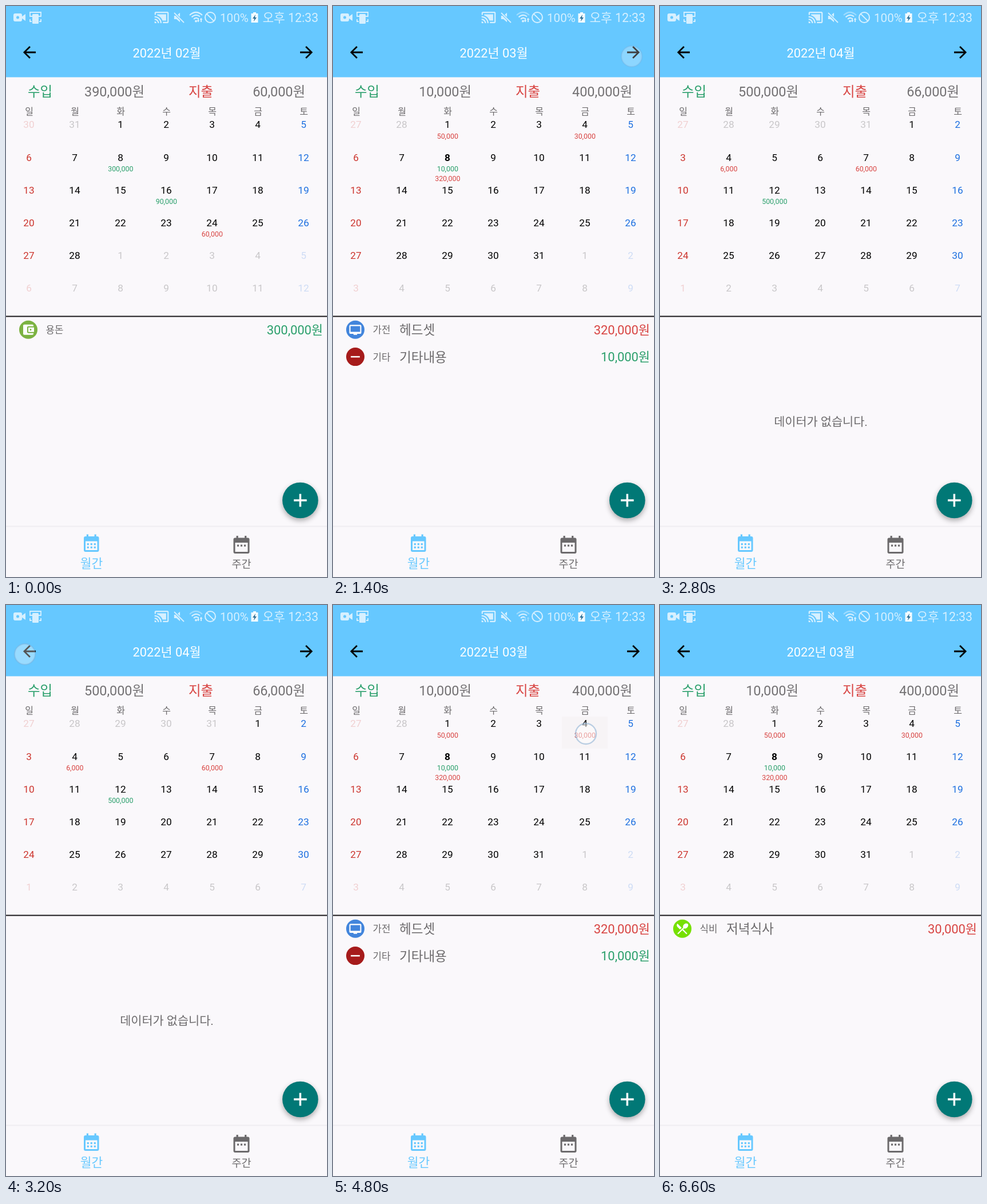
An HTML page with a canvas for the animation above (6700 ms loop, 561 px wide and 998 px high).

```html
<!DOCTYPE html>
<html lang="ko">
<head>
<meta charset="utf-8">
<style>
html, body { margin: 0; height: 100%; overflow: hidden; background: #faf8fb; }
canvas { display: block; width: 561px; height: 998px; }
</style>
</head>
<body>
<canvas id="stage" width="561" height="998"></canvas>
<script>
const ctx = document.getElementById('stage').getContext('2d');
const BG = '#faf8fb', BLUE = '#66c8ff', GREY = '#6c6a6c', GREEN = '#2a9f6b', RED = '#d84442', STATUS = '#d6f0ff';
const LOOP = 6700;

// Icons on a 24 unit grid
const ICON = {
  back: 'M20 11H7.83l5.59-5.59L12 4l-8 8 8 8 1.41-1.41L7.83 13H20v-2z',
  next: 'M12 4l-1.41 1.41L16.17 11H4v2h12.17l-5.58 5.59L12 20l8-8z',
  wallet: 'M21 18v1c0 1.1-.9 2-2 2H5c-1.11 0-2-.9-2-2V5c0-1.1.89-2 2-2h14c1.1 0 2 .9 2 2v1h-9c-1.11 0-2 .9-2 2v8c0 1.1.89 2 2 2h9zm-9-2h10V8H12v8zm4-2.5c-.83 0-1.5-.67-1.5-1.5s.67-1.5 1.5-1.5 1.5.67 1.5 1.5-.67 1.5-1.5 1.5z',
  tablet: 'M4 4h16a2 2 0 0 1 2 2v11a2 2 0 0 1-2 2h-5v1.5H9V19H4a2 2 0 0 1-2-2V6a2 2 0 0 1 2-2zm0 2v9.500h16V6z',
  minus: 'M4.500 10.800h15v2.400h-15z',
  food: 'M8.1 13.34l2.83-2.83L3.91 3.5c-1.56 1.56-1.56 4.09 0 5.66l4.19 4.18zm6.78-1.81c1.53.71 3.68.21 5.27-1.38 1.91-1.91 2.28-4.65.81-6.12-1.46-1.46-4.2-1.1-6.12.81-1.59 1.59-2.09 3.74-1.38 5.27L3.7 19.87l1.41 1.41L12 14.41l6.88 6.88 1.41-1.41L13.41 13l1.47-1.47z',
  cast: 'M1 18v3h3c0-1.66-1.34-3-3-3zm0-4v2c2.76 0 5 2.24 5 5h2c0-3.87-3.13-7-7-7zm18-7H5v1.63c3.96 1.28 7.09 4.41 8.37 8.37H19V7zM1 10v2c4.97 0 9 4.03 9 9h2c0-6.08-4.93-11-11-11zm20-7H3c-1.1 0-2 .9-2 2v3h2V5h18v14h-7v2h7c1.1 0 2-.9 2-2V5c0-1.1-.9-2-2-2z',
  mute: 'M4 9v6h4l6 5V4L8 9z'
};

const MONTHS = {
  2: { income: '390,000', spent: '60,000', marks: { 8: [[GREEN, '300,000']], 16: [[GREEN, '90,000']], 24: [[RED, '60,000']] } },
  3: { income: '10,000', spent: '400,000', marks: { 1: [[RED, '50,000']], 4: [[RED, '30,000']], 8: [[GREEN, '10,000'], [RED, '320,000']] } },
  4: { income: '500,000', spent: '66,000', marks: { 4: [[RED, '6,000']], 7: [[RED, '60,000']], 12: [[GREEN, '500,000']] } }
};
const POCKET = [['wallet', '#7cb342', '용돈', '', GREEN, '300,000']];
const MARCH_8 = [
  ['tablet', '#4285dc', '가전', '헤드셋', RED, '320,000'],
  ['minus', '#a61b1b', '기타', '기타내용', GREEN, '10,000']
];
const MARCH_4 = [['food', '#76e000', '식비', '저녁식사', RED, '30,000']];

// [start, month, list]
const SCENES = [[0, 2, POCKET], [800, 3, MARCH_8], [1900, 4, []], [3400, 3, MARCH_8], [5100, 3, MARCH_4]];
// [start, length, x, y]
const TOUCHES = [[500, 300, 522, 88], [1400, 400, 522, 88], [3000, 300, 33, 86], [4700, 300, 442, 225]];

function text(s, x, y, size, color, align = 'center', weight = 400) {
  ctx.font = `${weight} ${size}px Roboto, "Noto Sans CJK KR", sans-serif`;
  ctx.textAlign = align;
  ctx.fillStyle = color;
  ctx.fillText(s, x, y);
}

function box(x, y, w, h, color, r = 0) {
  ctx.fillStyle = color;
  ctx.beginPath();
  ctx.roundRect(x, y, w, h, r);
  ctx.fill();
}

function disc(x, y, r, color) {
  ctx.fillStyle = color;
  ctx.beginPath();
  ctx.arc(x, y, r, 0, 7);
  ctx.fill();
}

function shape(d, color) {
  ctx.fillStyle = color;
  ctx.fill(new Path2D(d));
}

function stroke(d, color, width) {
  ctx.strokeStyle = color;
  ctx.lineWidth = width;
  ctx.stroke(new Path2D(d));
}

function icon(name, x, y, scale, color) {
  ctx.save();
  ctx.translate(x, y);
  ctx.scale(scale, scale);
  ctx.translate(-12, -12);
  ctx.fillStyle = color;
  ctx.fill(new Path2D(ICON[name]), name === 'tablet' ? 'evenodd' : 'nonzero');
  ctx.restore();
}

function statusBar(t) {
  box(13, 13, 15, 14, STATUS, 3);
  shape('M27 19l7-5v12l-7-5z', STATUS);
  disc(20.5, 20, 2.5, BLUE);
  stroke('M46 18H42V11H61V18H57M42 23V27H45M61 23V27H58', STATUS, 1.8);
  box(46, 14, 11, 17, STATUS, 1.5);
  icon('cast', 272, 20, 1.12, STATUS);
  icon('mute', 302, 20, 1.02, STATUS);
  stroke('M294 12L311 29', BLUE, 4);
  stroke('M294 12L311 29', STATUS, 1.8);

  ctx.globalAlpha = t < 1400 ? 1 : 0.5;
  stroke('M321 16Q332 6 343 16', STATUS, 2.2);
  ctx.globalAlpha = 1;
  stroke('M324.500 19.500Q332 13 339 18.500M328 23Q332 19.500 335 22', STATUS, 2.2);
  disc(332, 26.5, 2, STATUS);
  ctx.globalAlpha = t >= 4400 && t < 6400 ? 0.4 : 1;
  shape('M335 21h2v4h1.500l-2.500 3.500-2.500-3.500h1.500zM340 28h2v-4h1.500l-2.500-3.500-2.500 3.500h1.500z', STATUS);
  ctx.globalAlpha = 1;

  stroke('M366 20A9 9 0 1 1 348 20A9 9 0 1 1 366 20M350.600 13.600L363.400 26.400', STATUS, 2);
  text('100%', 374, 28, 20.6, STATUS, 'left');
  shape('M432 11h5v2h3.500v16h-12v-16h3.500z', '#f2fbff');
  shape('M436 15l-5 7h3l-1 5 5-7h-3z', '#2f6f96');
  text('오후 12:33', 546, 28, 21.3, STATUS, 'right');
}

function calendar(month) {
  const { income, spent, marks } = MONTHS[month];
  text(`2022년 0${month}월`, 281, 89.5, 21.8, '#fff');
  text('수입', 59.5, 158, 23.4, GREEN);
  text(income + '원', 242, 158, 23.4, '#737173', 'right');
  text('지출', 340.5, 158, 23.4, RED);
  text(spent + '원', 523, 158, 23.4, '#737173', 'right');
  [...'일월화수목금토'].forEach((d, i) => text(d, 40.5 + 80 * i, 190, 16, GREY));

  const lead = new Date(2022, month - 1, 1).getDay();
  for (let i = 0; i < 42; i++) {
    const date = new Date(2022, month - 1, 1 - lead + i);
    const day = date.getDate(), col = i % 7;
    const inside = date.getMonth() === month - 1;
    const x = 40 + 80 * col, y = 213.3 + 57.2 * Math.floor(i / 7);
    const color = col === 0 ? '#cc342d' : col === 6 ? '#1c6fe0' : '#000';
    ctx.globalAlpha = inside ? 1 : 0.2;
    text(day, x, y, 17.2, color, 'center', month === 3 && day === 8 && inside ? 700 : 400);
    ctx.globalAlpha = 1;
    if (inside) (marks[day] || []).forEach(([c, s], n) => text(s, x + 0.3, y + 18.2 + 17 * n, 12.4, c));
  }
  box(0, 541.6, 561, 1.9, '#1b191b');
}

function list(items) {
  if (!items.length) text('데이터가 없습니다.', 281, 734, 20.8, GREY);
  items.forEach(([name, color, kind, note, tone, sum], i) => {
    const y = 566 + 47.4 * i;
    disc(39, y - 0.3, 16, color);
    icon(name, 39, y - 0.3, name === 'wallet' ? 1 : 1.05, '#fff');
    text(kind, 69.5, y + 6.3, 16.8, GREY, 'left');
    text(note, 116, y + 8.3, 22.5, GREY, 'left');
    text(sum + '원', 554, y + 8, 21.9, tone, 'right');
  });
}

function navIcon(x, y, w, h, color, rows) {
  box(x, y, w, h, color, 3);
  for (const k of [0.18, 0.7]) box(x + w * k, y - 3.5, 3.2, 6, color);
  box(x + 3, y + 8.5, w - 6, h - 11.5, BG);
  for (let r = 0; r < rows; r++)
    for (let c = -1; c < 2; c++) box(x + w / 2 - 1.6 + 6 * c, y + 12 + 5.7 * r, 3.2, 3.2, color);
}

function bottom() {
  ctx.save();
  ctx.shadowColor = 'rgba(0,0,0,.32)';
  ctx.shadowBlur = 10;
  ctx.shadowOffsetY = 4;
  disc(514.3, 864, 31.3, '#017876');
  ctx.restore();
  stroke('M503 864H525.600M514.300 852.700V875.300', '#fff', 3.5);
  box(0, 908.5, 561, 2, '#f0eef1');
  navIcon(136, 927, 26.5, 27, BLUE, 2);
  navIcon(397.5, 929.5, 28, 27.5, GREY, 1);
  text('월간', 149.5, 982, 21.4, BLUE);
  text('주간', 411.5, 982, 18.5, GREY);
}

function touches(t) {
  if (t >= 4700 && t < 5300) {
    ctx.globalAlpha = Math.min(1, (5300 - t) / 400);
    box(400, 195, 80, 56, 'rgba(110,90,50,.025)');
    ctx.globalAlpha = 1;
  }
  for (const [start, length, x, y] of TOUCHES) {
    const u = t - start;
    if (u < 0 || u >= length) continue;
    ctx.globalAlpha = Math.min(1, (u + 100) / 200, (length - u) / 150);
    disc(x, y, 18, 'rgba(255,255,255,.5)');
    ctx.strokeStyle = 'rgba(125,165,205,.5)';
    ctx.lineWidth = 2.4;
    ctx.stroke();
    ctx.globalAlpha = 1;
  }
}

function draw(now) {
  const t = Math.floor((now % LOOP) / 100) * 100;
  const [, month, items] = SCENES.findLast(s => s[0] <= t);
  box(0, 0, 561, 998, BG);
  box(0, 0, 561, 124.5, BLUE);
  statusBar(t);
  icon('back', 41, 81, 1.38, '#000');
  icon('next', 525, 81, 1.38, '#000');
  calendar(month);
  list(items);
  bottom();
  touches(t);
}

let begin;
function frame(now) {
  begin ??= now;
  draw(now - begin);
  requestAnimationFrame(frame);
}
requestAnimationFrame(frame);
</script>
</body>
</html>
```
